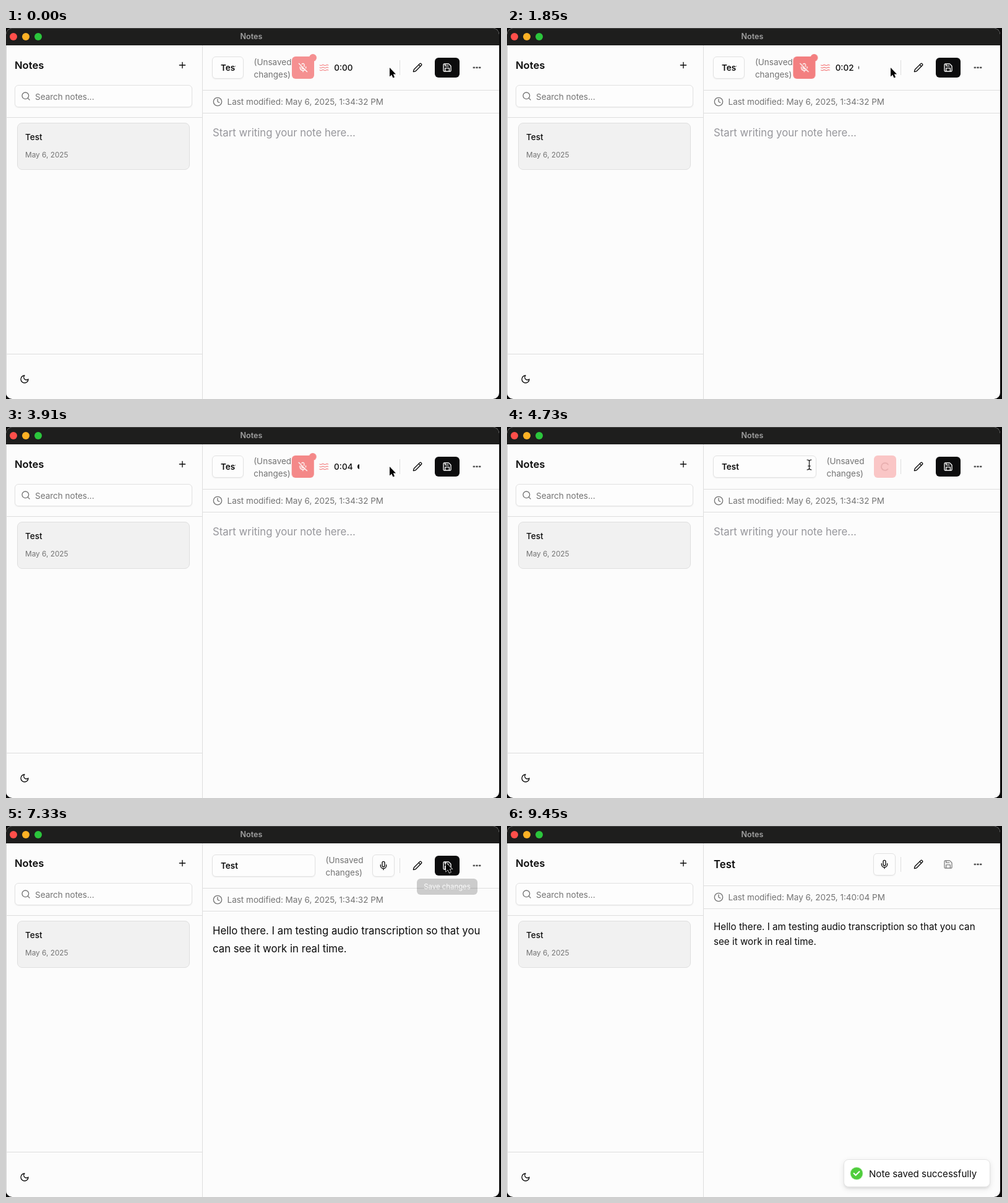
Animation, 800 px wide and 599 px high, one loop 9.51 s. Source, as an HTML page:

```html
<!DOCTYPE html>
<html lang="en">
<head>
<meta charset="utf-8">
<title>Notes</title>
<style>
html, body { margin: 0; width: 100%; height: 100%; overflow: hidden; background: #0b0b0b; }
body { position: relative; font: 13.5px/20px Inter, "Open Sans", sans-serif; color: #0a0a0a; }
div, span, svg { position: absolute; box-sizing: border-box; white-space: nowrap; }
svg { overflow: visible; }
.win { width: 797px; height: 599px; border-radius: 10px; overflow: hidden; background: #fcfcfc; }
.bar { width: 797px; height: 28px; background: #1e1e1d; border-radius: 10px 10px 0 0; box-shadow: inset 0 1px #4a4a4a; }
.bar i { position: absolute; top: 8px; width: 12px; height: 12px; border-radius: 50%; }
.edge { left: 0; top: 28px; width: 1px; height: 571px; background: #d4d4d4; }
.line { background: #dedede; height: 1px; }
.i { width: 16px; height: 16px; fill: none; stroke: currentColor; stroke-width: 2; stroke-linecap: round; stroke-linejoin: round; }
.mute { color: #737373; }
.med { font-weight: 500; }
.semi { font-weight: 600; }
.box { border: 1px solid #e2e2e2; border-radius: 6px; box-shadow: 0 1px 2px rgba(0,0,0,.06); background: #fdfdfd; }
.btn { width: 36px; height: 36px; border-radius: 6px; }
.btn .i { left: 10px; top: 10px; }

/* one loop is 9.51s; phases: record, process, edit, saved */
.rec, .proc, .open, .edit, .saved, .empty, .mic, .field, .shift, .col, .up2, .up4 {
  animation: 9.51s step-end infinite;
}
.rec { animation-name: rec; }
.proc { animation-name: proc; }
.open { animation-name: open; }
.empty { animation-name: empty; }
.edit { animation-name: edit; }
.saved { animation-name: saved; }
.field { animation-name: field; }
.shift { animation-name: shift; }
.col { animation-name: tick; }
.up2 { animation-name: up2; }
.up4 { animation-name: up4; }
.mic { animation-name: mic; animation-timing-function: linear; }
@keyframes rec { 0% { opacity: 1 } 48.58%, 100% { opacity: 0 } }
@keyframes proc { 0% { opacity: 0 } 48.58% { opacity: 1 } 61.51%, 100% { opacity: 0 } }
@keyframes open { 0% { opacity: 1 } 78.86%, 100% { opacity: 0 } }
@keyframes empty { 0% { opacity: 1 } 61.51%, 100% { opacity: 0 } }
@keyframes edit { 0% { opacity: 0 } 61.51% { opacity: 1 } 78.86%, 100% { opacity: 0 } }
@keyframes saved { 0% { opacity: 0 } 78.86%, 100% { opacity: 1 } }
@keyframes mic { 0%, 61.4% { opacity: 0 } 62.78%, 100% { opacity: 1 } }
@keyframes up2 { 0% { transform: none } 78.86%, 100% { transform: translateY(-2px) } }
@keyframes up4 { 0% { transform: none } 78.86%, 100% { transform: translateY(-4px) } }

/* the narrow digit 1 moves everything left of the timer */
@keyframes field {
  0% { width: 51px } 2.63% { width: 53.5px } 13.14% { width: 51.4px } 23.66% { width: 51.3px }
  34.17% { width: 50.7px } 44.69% { width: 51.3px } 48.58%, 100% { width: 167px }
}
@keyframes shift {
  0% { transform: none } 2.63% { transform: translateX(2.5px) } 13.14% { transform: translateX(.4px) }
  23.66% { transform: translateX(.3px) } 34.17% { transform: translateX(-.3px) }
  44.69% { transform: translateX(.3px) } 48.58%, 100% { transform: translateX(116px) }
}
@keyframes tick {
  0% { transform: none } 2.63% { transform: translateY(-20px) } 13.14% { transform: translateY(-40px) }
  23.66% { transform: translateY(-60px) } 34.17% { transform: translateY(-80px) }
  44.69%, 100% { transform: translateY(-100px) }
}
.pulse { animation: pulse 9.51s cubic-bezier(.4,0,.6,1) infinite; }
@keyframes pulse {
  0% { opacity: .58; animation-timing-function: ease-out }
  2.63%, 23.66%, 44.69% { opacity: .5 }
  13.14%, 34.17%, 55.21%, 100% { opacity: 1 }
}
.level { left: 0; top: 0; height: 8px; background: #111; animation: level .2971875s cubic-bezier(.37,0,.63,1) infinite alternate; }
@keyframes level { from { width: 0 } to { width: 3.2px } }
.spin { animation: spin 9.51s linear infinite; }
@keyframes spin { 0%, 48.58% { transform: none } 61.51%, 100% { transform: rotate(443deg) } }

.fill { left: 0; top: 0; width: 40px; height: 32px; border-radius: 6px; }
.ghost { background: #f6f6f6; animation: ghost 9.51s linear infinite; }
@keyframes ghost { 0%, 78.85% { opacity: 0 } 78.86%, 84.4% { opacity: 1 } 86%, 100% { opacity: 0 } }
.dark { background: #0c0c0d; animation: dark 9.51s linear infinite; }
@keyframes dark { 0%, 78.86% { opacity: 1 } 80.4%, 100% { opacity: 0 } }
.tip { left: 664px; top: 85px; width: 98px; height: 26px; border-radius: 6px; background: #171717; color: #fff;
  font-size: 11.4px; line-height: 26px; text-align: center; animation: tip 9.51s linear infinite; }
@keyframes tip { 0%, 76.76% { opacity: 0 } 78.34%, 78.85% { opacity: 1 } 78.86%, 100% { opacity: 0 } }

.toast { left: 544px; top: 538px; width: 237px; height: 45px; border-radius: 8px; background: #fff; border: 1px solid #e4e4e4;
  box-shadow: 0 3px 10px rgba(0,0,0,.1), 0 3px 3px rgba(0,0,0,.05); animation: toast 9.51s infinite; }
@keyframes toast {
  0%, 78.85% { opacity: 0; transform: translateY(200%) scale(.6) }
  78.86% { opacity: .5; transform: translateY(200%) scale(.6); animation-timing-function: cubic-bezier(.21,1.02,.73,1) }
  82.54%, 100% { opacity: 1; transform: none }
}
.disc { transform-origin: 10px 10px; animation: disc 9.51s infinite; }
@keyframes disc {
  0%, 79.92% { transform: rotate(45deg) scale(0); animation-timing-function: cubic-bezier(.175,.885,.32,1.275) }
  83.07%, 100% { transform: rotate(45deg) scale(1) }
}
.check { stroke-dasharray: 14 30; animation: check 9.51s ease-out infinite; }
@keyframes check {
  0%, 80.96% { stroke-dashoffset: 14; opacity: 0 } 80.97% { stroke-dashoffset: 14; opacity: 1 }
  81.81% { stroke-dashoffset: 9; opacity: 1 } 83.07%, 100% { stroke-dashoffset: 0; opacity: 1 }
}

.cursor { left: 0; top: 0; width: 1px; height: 1px; animation: move 9.51s ease-in-out infinite, away 9.51s linear infinite; }
@keyframes move {
  0%, 42.06% { transform: translate(620px, 64px) }
  46.27%, 68.14% { transform: translate(488px, 60px) }
  73.82%, 100% { transform: translate(711px, 59px) }
}
@keyframes away { 0%, 95.27% { opacity: 1 } 98.8%, 100% { opacity: 0 } }
.arrow, .beam { animation: 9.51s step-end infinite; }
.arrow { animation-name: arrow; }
.beam { animation-name: beam; }
@keyframes arrow { 0% { opacity: 1 } 48.58% { opacity: 0 } 69.6%, 100% { opacity: 1 } }
@keyframes beam { 0% { opacity: 0 } 48.58% { opacity: 1 } 69.6%, 100% { opacity: 0 } }
</style>
</head>
<body>
<svg width="0" height="0">
  <symbol id="plus" viewBox="0 0 24 24"><path d="M5 12h14M12 5v14"/></symbol>
  <symbol id="search" viewBox="0 0 24 24"><circle cx="11" cy="11" r="8"/><path d="m21 21-4.3-4.3"/></symbol>
  <symbol id="moon" viewBox="0 0 24 24"><path d="M12 3a6 6 0 0 0 9 9 9 9 0 1 1-9-9Z"/></symbol>
  <symbol id="clock" viewBox="0 0 24 24"><circle cx="12" cy="12" r="10"/><path d="M12 6v6l4 2"/></symbol>
  <symbol id="pencil" viewBox="0 0 24 24"><path d="M21.17 6.81a1 1 0 0 0-3.98-3.99L3.84 16.17a2 2 0 0 0-.5.83l-1.32 4.36a.5.5 0 0 0 .62.62l4.36-1.32a2 2 0 0 0 .83-.5zM15 5l4 4"/></symbol>
  <symbol id="save" viewBox="0 0 24 24"><path d="M15.2 3a2 2 0 0 1 1.4.6l3.8 3.8a2 2 0 0 1 .6 1.4V19a2 2 0 0 1-2 2H5a2 2 0 0 1-2-2V5a2 2 0 0 1 2-2zM17 21v-7a1 1 0 0 0-1-1H8a1 1 0 0 0-1 1v7M7 3v4a1 1 0 0 0 1 1h7"/></symbol>
  <symbol id="dots" viewBox="0 0 24 24"><path d="M4 12h2M11 12h2M18 12h2" stroke-width="3"/></symbol>
  <symbol id="mic" viewBox="0 0 24 24"><path d="M12 2a3 3 0 0 0-3 3v7a3 3 0 0 0 6 0V5a3 3 0 0 0-3-3ZM19 10v2a7 7 0 0 1-14 0v-2M12 19v3"/></symbol>
  <symbol id="micoff" viewBox="0 0 24 24"><path d="M2 2l20 20M18.89 13.23A7.12 7.12 0 0 0 19 12v-2M5 10v2a7 7 0 0 0 12 5M15 9.34V5a3 3 0 0 0-5.68-1.33M9 9v3a3 3 0 0 0 5.12 2.12M12 19v3"/></symbol>
  <symbol id="waves" viewBox="0 0 24 24">
    <path id="wave" d="M2 6c.6.5 1.2 1 2.5 1C7 7 7 5 9.5 5c2.6 0 2.4 2 5 2 2.5 0 2.5-2 5-2 1.3 0 1.9.5 2.5 1"/>
    <use href="#wave" y="6"/><use href="#wave" y="12"/>
  </symbol>
  <symbol id="loader" viewBox="0 0 24 24"><path d="M21 12a9 9 0 1 1-6.22-8.56"/></symbol>
</svg>

<div class="win">
  <div class="bar">
    <i style="left:6px;background:#fe4f4a"></i><i style="left:26px;background:#fdb125"></i><i style="left:46px;background:#2bc53c"></i>
    <span class="semi" style="left:378.5px;top:3.5px;font-size:12.6px;color:#a0a0a0">Notes</span>
  </div>
  <div class="edge"></div>

  <!-- sidebar -->
  <span class="semi" style="left:14px;top:50px;font-size:16.6px">Notes</span>
  <svg class="i" style="left:277px;top:52px"><use href="#plus"/></svg>
  <div class="box" style="left:14px;top:92px;width:287px;height:36px"></div>
  <svg class="i mute" style="left:24px;top:102px"><use href="#search"/></svg>
  <span class="mute" style="left:47px;top:100.5px">Search notes...</span>
  <div class="line" style="left:0;top:144px;width:317px"></div>
  <div style="left:18px;top:153px;width:279px;height:76px;border:1px solid #dfdfdf;border-radius:8px;background:#f1f1f1"></div>
  <span class="med" style="left:31px;top:166px">Test</span>
  <span class="mute" style="left:31px;top:194.5px;font-size:11.8px">May 6, 2025</span>
  <div class="line" style="left:0;top:526px;width:317px"></div>
  <svg class="i" style="left:22px;top:559px"><use href="#moon"/></svg>
  <div class="line" style="left:317px;top:28px;width:1px;height:571px"></div>

  <!-- title and recorder -->
  <div class="open">
    <div class="box field" style="left:333px;top:46px;height:36px">
      <div style="left:13px;right:12px;top:7px;height:20px;overflow:hidden"><span class="semi" style="left:0">Test</span></div>
    </div>
    <div class="shift mute" style="left:400.5px;top:44.5px">(Unsaved<br>changes)</div>
  </div>
  <div class="rec">
    <div class="shift">
      <div class="btn pulse" style="left:461.5px;top:46px;background:#ef4142;color:#fff">
        <svg class="i"><use href="#micoff"/></svg>
        <div style="left:28px;top:-4px;width:12px;height:12px;border-radius:50%;background:#ef4142"></div>
      </div>
      <svg class="i pulse" style="left:505.5px;top:56px;color:#ef4142"><use href="#waves"/></svg>
    </div>
    <div style="left:520px;top:54px;width:40.5px;height:20px;overflow:hidden">
      <div class="col med" style="right:0;text-align:right">0:00<br>0:01<br>0:02<br>0:03<br>0:04<br>0:05</div>
    </div>
    <div style="left:568px;top:60px;width:60px;height:8px;border-radius:4px;overflow:hidden"><div class="level"></div></div>
  </div>
  <div class="proc btn" style="left:592.5px;top:46px;background:#fac6c6;color:#e2a8a8">
    <svg class="i spin"><use href="#loader"/></svg>
  </div>
  <span class="saved semi" style="left:334px;top:52px;font-size:16.8px">Test</span>

  <!-- actions -->
  <div class="up2">
    <div class="mic"><div class="btn box" style="left:592px;top:46px"><svg class="i" style="left:9px;top:9px"><use href="#mic"/></svg></div></div>
    <div class="line" style="left:636px;top:52px;width:1px;height:24px"></div>
    <svg class="i" style="left:657px;top:56px"><use href="#pencil"/></svg>
    <div style="left:693px;top:48px;width:40px;height:32px">
      <div class="fill ghost"></div>
      <div class="fill dark"></div>
      <svg class="i open" style="left:12px;top:8px;color:#fff"><use href="#save"/></svg>
      <svg class="i saved" style="left:12px;top:8px;color:#808080"><use href="#save"/></svg>
    </div>
    <svg class="i" style="left:753px;top:56px"><use href="#dots"/></svg>
  </div>

  <!-- date row -->
  <div class="up4 mute">
    <div class="line" style="left:318px;top:100px;width:479px"></div>
    <svg class="i" style="left:333.5px;top:111px"><use href="#clock"/></svg>
    <span class="open" style="left:357.5px;top:109px">Last modified: May 6, 2025, 1:34:32 PM</span>
    <span class="saved" style="left:357.5px;top:109px">Last modified: May 6, 2025, 1:40:04 PM</span>
    <div class="line" style="left:318px;top:137px;width:479px"></div>
  </div>

  <!-- note body -->
  <span class="empty" style="left:334px;top:159px;font-size:16.75px;color:#96969b">Start writing your note here...</span>
  <div class="edit" style="left:334px;top:154.5px;font-size:16.75px;line-height:29px">Hello there. I am testing audio transcription so that you<br>can see it work in real time.</div>
  <div class="saved" style="left:334px;top:150.5px;font-size:15.2px;line-height:24px">Hello there. I am testing audio transcription so that you can<br>see it work in real time.</div>

  <div class="tip">Save changes</div>
  <div class="toast">
    <svg width="20" height="20" style="left:10px;top:12px">
      <g class="disc">
        <circle cx="10" cy="10" r="10" fill="#4fcd3c"/>
        <path class="check" d="M6 13h5V4" fill="none" stroke="#fff" stroke-width="2"/>
      </g>
    </svg>
    <span style="left:40px;top:12.5px;font-size:15.1px">Note saved successfully</span>
  </div>
</div>

<svg class="cursor">
  <path class="arrow" d="M0 0V14.4L3.2 11.4L5.5 16.6L8 15.5L5.8 10.4H10Z" fill="#000" stroke="#fff" stroke-width="1.2" paint-order="stroke"/>
  <g class="beam" fill="none" stroke-linecap="round">
    <path id="bar" d="M-3 -7q3 0 3.5 2q.5-2 3.5-2M.5-5V7M-3 9q3 0 3.5-2q.5 2 3.5 2M-1.5 3h4" stroke="#fff" stroke-width="2.6"/>
    <path d="M-3 -7q3 0 3.5 2q.5-2 3.5-2M.5-5V7M-3 9q3 0 3.5-2q.5 2 3.5 2M-1.5 3h4" stroke="#111" stroke-width="1.2"/>
  </g>
</svg>
</body>
</html>
```
